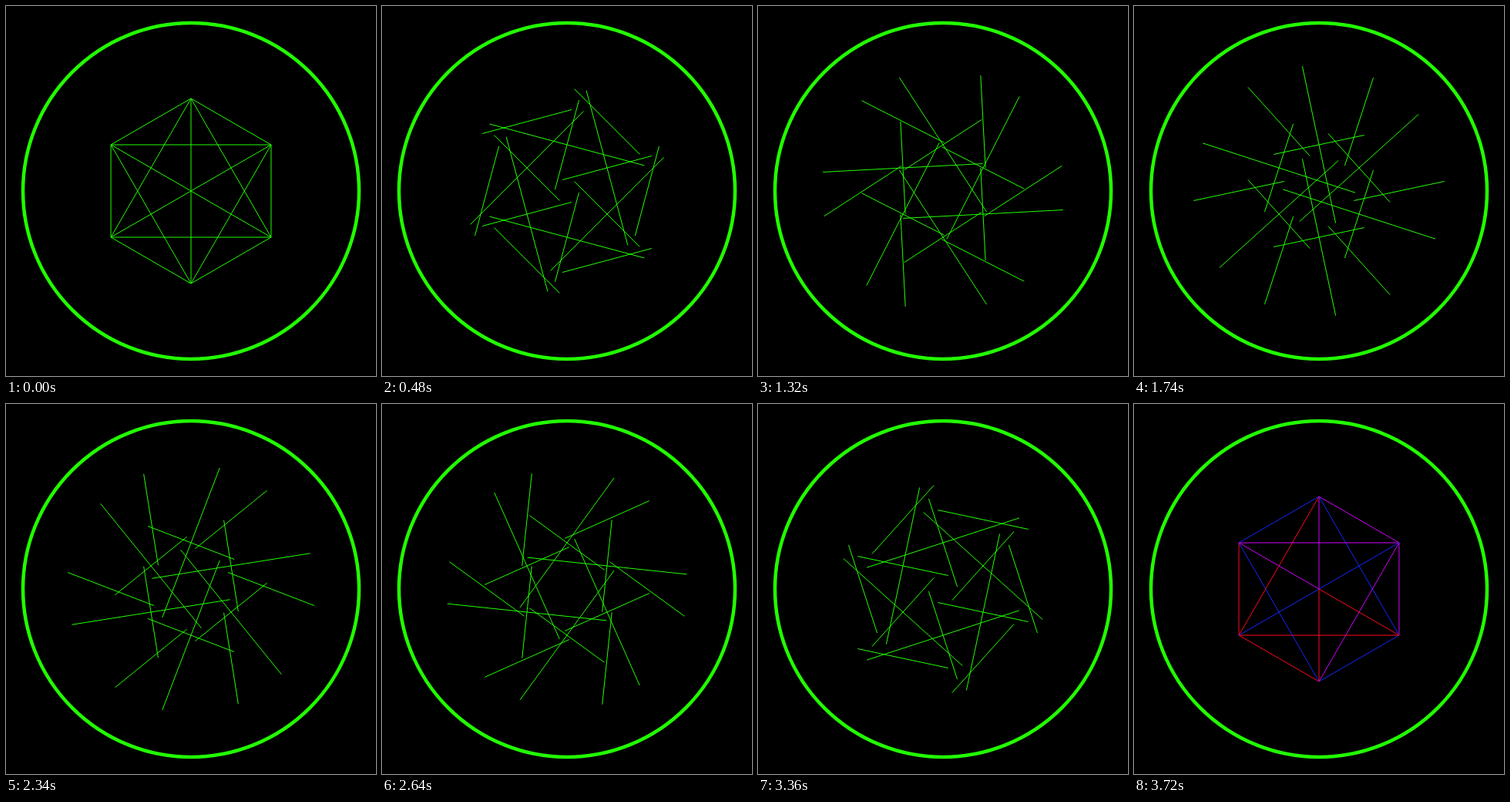
An HTML page with a canvas for the animation above (3.78 s loop, 480 px wide and 480 px high).

```html
<!DOCTYPE html>
<html lang="en">
<head>
<meta charset="utf-8">
<title>Turning hexagon</title>
<style>
  html, body { margin: 0; width: 100%; height: 100%; overflow: hidden; background: #000; }
  canvas { display: block; }
</style>
</head>
<body>
<canvas width="480" height="480"></canvas>
<script>
const ctx = document.querySelector('canvas').getContext('2d');
const STEP_MS = 60, STEPS = 63, CENTER = 240, RADIUS = 120;
const GREEN = '#22ff00';
const TINTS = { R: '#ff0a1e', B: '#1428ff', M: '#d400ff' };

const corner = i => {
  const a = (i * 60 - 90) * Math.PI / 180;
  return [CENTER + RADIUS * Math.cos(a), CENTER + RADIUS * Math.sin(a)];
};

// Each family has six lines, one per corner, with its own tints.
const family = (tints, otherEnd) => [...tints].map((tint, i) => {
  const [x1, y1] = corner(i), [x2, y2] = otherEnd(i);
  return {
    x: (x1 + x2) / 2, y: (y1 + y2) / 2,
    dx: (x2 - x1) / 2, dy: (y2 - y1) / 2,
    tint: TINTS[tint]
  };
});
const lines = [
  ...family('MMBRRB', i => corner(i + 1)),
  ...family('BMRBRM', i => corner(i + 2)),
  ...family('MBRRBM', () => [CENTER, CENTER])
];

// Rest, then two quarter turns at 3 degrees a step, jumping over 90.
function angleAt(step) {
  if (step < 3) return 0;
  return (step < 33 ? step - 3 : step - 2) * 3 * Math.PI / 180;
}

const isTinted = step => step === 1 || step === 3 || step === STEPS - 1;

function draw(step) {
  ctx.fillStyle = '#000';
  ctx.fillRect(0, 0, 480, 480);

  ctx.strokeStyle = GREEN;
  ctx.lineWidth = 4.5;
  ctx.beginPath();
  ctx.arc(CENTER, CENTER, 218, 0, 2 * Math.PI);
  ctx.stroke();

  ctx.lineWidth = 1;
  const cos = Math.cos(angleAt(step)), sin = Math.sin(angleAt(step));
  for (const { x, y, dx, dy, tint } of lines) {
    const ux = dx * cos - dy * sin, uy = dx * sin + dy * cos;
    ctx.strokeStyle = isTinted(step) ? tint : GREEN;
    ctx.beginPath();
    ctx.moveTo(x - ux, y - uy);
    ctx.lineTo(x + ux, y + uy);
    ctx.stroke();
  }
}

const start = performance.now();
function tick() {
  draw(Math.floor((performance.now() - start) / STEP_MS) % STEPS);
  requestAnimationFrame(tick);
}
tick();
</script>
</body>
</html>
```
